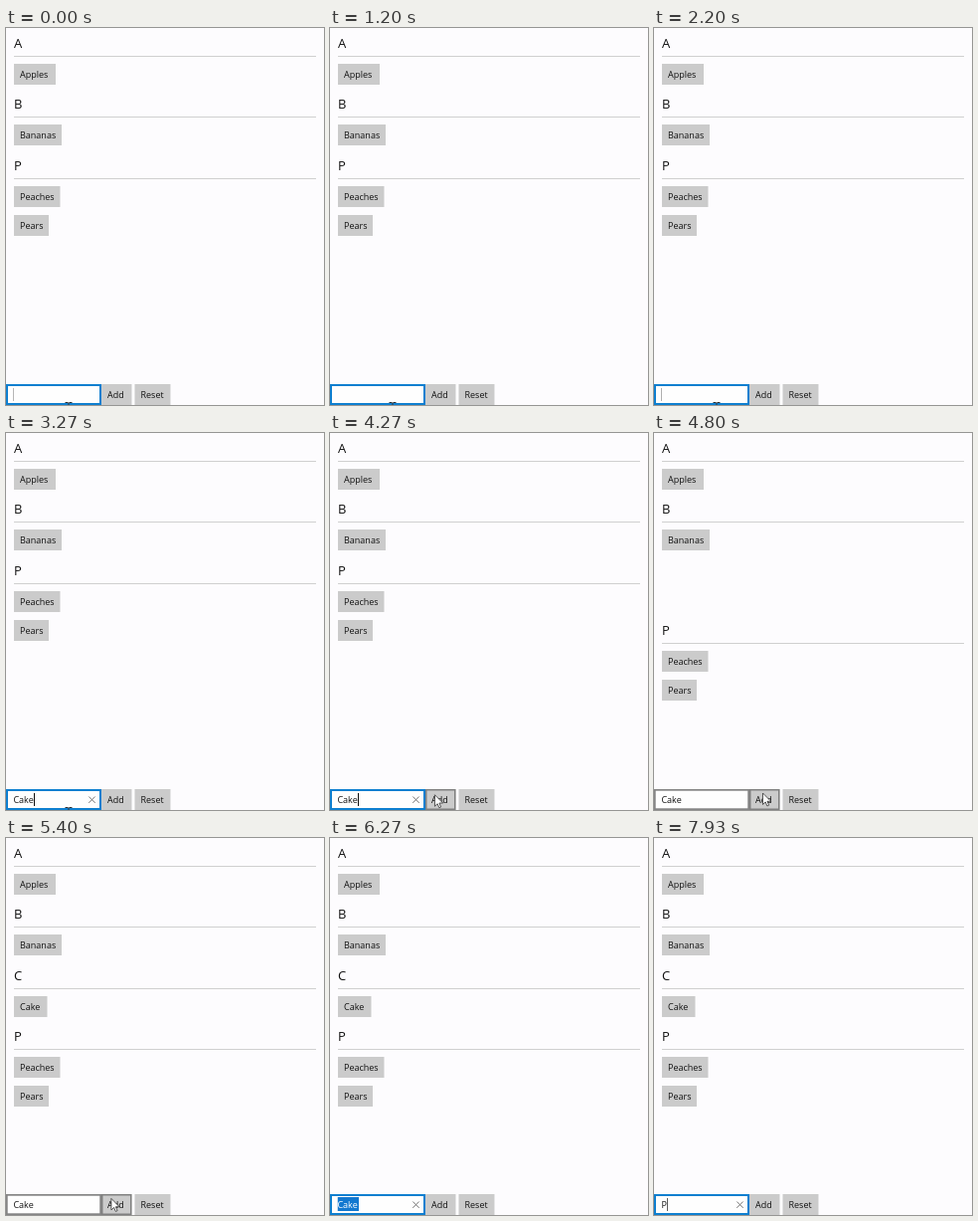
These frames come from a looping animation (320x379 px, 8 s). An HTML page with a canvas:

```html
<!DOCTYPE html>
<html lang="en">
<head>
<meta charset="utf-8">
<title>Grouped list</title>
<style>
  html, body { margin: 0; width: 100%; height: 100%; overflow: hidden; background: #fdfcfe; }
  canvas { display: block; }
</style>
</head>
<body>
<canvas id="stage" width="320" height="379"></canvas>
<script>
const ctx = document.getElementById('stage').getContext('2d');
const LOOP = 8000, STEP = 200 / 3, GROUP = 61.25;
const INK = '#111', GREY = '#cbcbcb', BLUE = '#0e7fd0';
const CLICK = 4530, REFOCUS = 5930, DRAG = 6130, DRAG_END = 6270, RETYPE = 7470;

const clamp = v => Math.max(0, Math.min(1, v));
const ramp = (t, a, b) => clamp((t - a) / (b - a));
const smooth = p => p * p * (3 - 2 * p);
const mix = (a, b, p) => a + (b - a) * p;

const typing = [[0, ''], [2270, 'C'], [2600, 'Ca'], [3000, 'Cak'], [3270, 'Cake'], [RETYPE, 'P']];
const caretKeys = [
  [0, .3], [70, 0], [470, 0], [670, 1], [1000, 1], [1200, 0], [1530, 0], [1730, 1],
  [2070, 1], [2200, .33], [2270, 1], [3600, 1], [3730, 0], [4000, 0], [4130, 1],
  [7870, 1], [8000, .3]
];

function caretAlpha(t) {
  const i = caretKeys.findIndex(k => k[0] > t);
  const [t0, a0] = caretKeys[i - 1], [t1, a1] = caretKeys[i];
  return mix(a0, a1, ramp(t, t0, t1));
}

function rect(x, y, w, h, color) {
  ctx.fillStyle = color;
  ctx.fillRect(x, y, w, h);
}

function text(str, x, y, size = 9, color = INK) {
  ctx.font = `${size}px "Open Sans", sans-serif`;
  ctx.fillStyle = color;
  ctx.fillText(str, x, y);
}

function border(x, y, w, h, color, width) {
  ctx.strokeStyle = color;
  ctx.lineWidth = width;
  ctx.strokeRect(x + width / 2, y + width / 2, w - width, h - width);
}

function button(label, x, y, w) {
  rect(x, y, w, 21, GREY);
  text(label, x + 6, y + 14.1);
}

function group(letter, y, items, alpha = 1) {
  ctx.globalAlpha = alpha;
  text(letter, 8, y + 20, 13);
  rect(8, y + 28, 304, 1, '#d0d0d0');
  items.forEach(([label, width], i) => button(label, 8, Math.round(y + 36.2 + i * 29), width));
  ctx.globalAlpha = 1;
}

function list(t) {
  const shift = GROUP * (1 - (1 - ramp(t, 4567, 4967)) ** 6);
  group('A', 0, [['Apples', 42]]);
  group('B', Math.round(GROUP), [['Bananas', 48]]);
  group('C', Math.round(GROUP * 2), [['Cake', 33.5]], ramp(t, 4800, 5330));
  group('P', Math.round(GROUP * 2 + shift), [['Peaches', 46.5], ['Pears', 35]]);
}

function textBox(t) {
  const focused = t < CLICK || t >= REFOCUS;
  const value = typing.filter(k => k[0] <= t).pop()[1];
  rect(0, 358, 96, 21, '#fefefe');
  border(0, 358, 96, 21, focused ? BLUE : '#858585', focused ? 2 : 1.7);
  text(value, 7.4, 372);
  const end = 7.4 + ctx.measureText(value).width;

  if (t >= DRAG && t < RETYPE) {
    const left = mix(24, 7.5, ramp(t, DRAG, DRAG_END));
    ctx.save();
    ctx.beginPath();
    ctx.rect(left, 361, 29 - left, 14);
    ctx.clip();
    rect(left, 361, 29 - left, 14, '#1278d0');
    text(value, 7.4, 372, 9, '#fff');
    ctx.restore();
  } else if (focused) {
    ctx.globalAlpha = caretAlpha(t);
    rect(Math.round(end), 362, 1, 13, INK);
    ctx.globalAlpha = 1;
  }

  if (focused && value) {
    ctx.strokeStyle = '#666';
    ctx.lineWidth = .9;
    ctx.beginPath();
    ctx.moveTo(83.3, 365.5); ctx.lineTo(89.7, 371.9);
    ctx.moveTo(89.7, 365.5); ctx.lineTo(83.3, 371.9);
    ctx.stroke();
  }
}

function pointerAt(t) {
  if (t < 5330) {
    const p = smooth(ramp(t, 4000, 4330));
    return [mix(63, 109.5, p), mix(382, 362, p)];
  }
  if (t < DRAG) {
    const p = smooth(ramp(t, 5330, 5800));
    return [mix(109.5, 50, p), mix(362, 369, p)];
  }
  return [mix(50, 8, ramp(t, 6070, DRAG_END)), 369];
}

function pointer(x, y) {
  ctx.save();
  ctx.translate(x, y);
  if (x < 96) {
    rect(-3.5, -6, 3, 1, '#333');
    rect(.5, -6, 3, 1, '#333');
    rect(-.5, -5.5, 1, 11, '#333');
    rect(-3.5, 5, 7, 1, '#333');
  } else {
    const arrow = new Path2D('M0 0V11.5L2.7 9L4.4 13L6.2 12.2L4.5 8.3H8.2Z');
    ctx.fillStyle = '#fff';
    ctx.fill(arrow);
    ctx.strokeStyle = '#333';
    ctx.lineWidth = .8;
    ctx.stroke(arrow);
  }
  ctx.restore();
}

function draw(t) {
  rect(0, 0, 320, 379, '#fdfcfe');
  list(t);
  textBox(t);
  button('Add', 96, 358, 30.5);
  button('Reset', 129.5, 358, 36);
  const [x, y] = pointerAt(t);
  if (x >= 96) border(96, 358, 30.5, 21, '#808080', 1.5);
  if (t < DRAG_END) pointer(x, y);
}

function tick(now) {
  const step = Math.floor((now % LOOP + 5) / STEP) % (LOOP / STEP);
  draw(Math.round(step * STEP / 10) * 10);
  requestAnimationFrame(tick);
}
requestAnimationFrame(tick);
</script>
</body>
</html>
```
